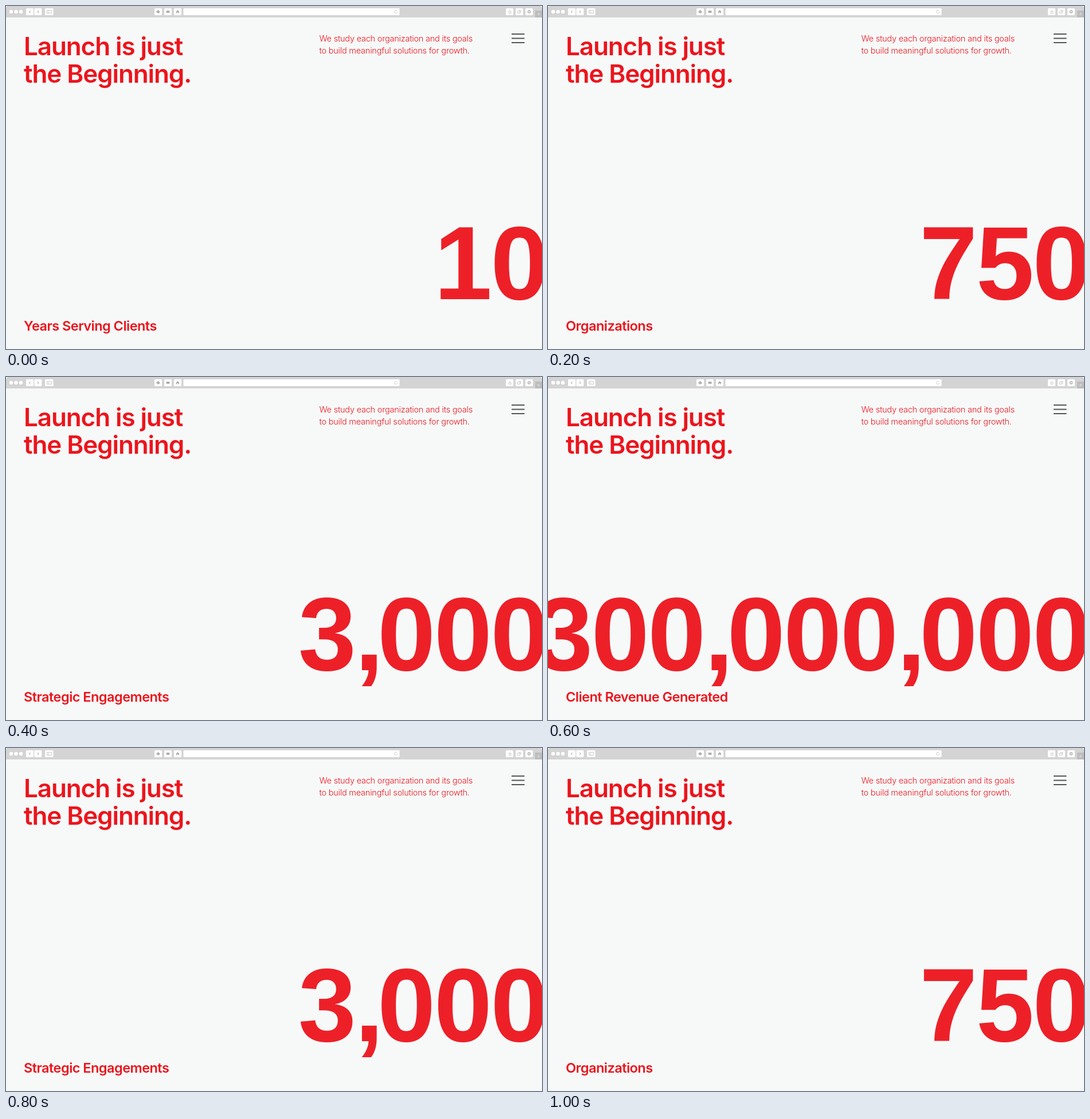
Recreate the animation shown at these times as an HTML page. Size 935 by 599 pixels, loop 1200 ms.

```html
<!DOCTYPE html>
<html lang="en">
<head>
<meta charset="utf-8">
<title>Counting up</title>
<style>
  html, body { margin: 0; width: 100%; height: 100%; overflow: hidden; background: #fff; }
  svg { display: block; width: 100%; height: 100%; }
  text { font-family: Inter, "Liberation Sans", sans-serif; font-optical-sizing: none; fill: #ed141c; }
  .title { font-size: 44px; font-weight: 640; letter-spacing: -1.1px; }
  .intro { font-size: 14.5px; font-weight: 300; letter-spacing: -.21px; }
  #label { font-size: 23.5px; font-weight: 640; letter-spacing: -.53px; }
  #count { font: bold 182px "Liberation Sans", Arial, sans-serif; fill: #ed2028; }
  .icon { fill: none; stroke: #ccc; }
</style>
</head>
<body>
<svg viewBox="0 0 935 599">
  <rect y="10" width="935" height="589" fill="#f7f9f9"/>
  <path d="M0 20V4Q0 0 4 0H931Q935 0 935 4V20Z" fill="#d4d4d4"/>
  <g id="bar" fill="#fff">
    <circle cx="9" cy="10" r="3.2"/>
    <circle cx="17.5" cy="10" r="3.2"/>
    <circle cx="26" cy="10" r="3.2"/>
  </g>
  <path d="M923 8H935V20H923Z" fill="#bdbdbd"/>
  <path d="M926.5 14H931.5M929 11.5V16.5" stroke="#ddd"/>
  <g class="icon">
    <path d="M42.5 8L40.5 10L42.5 12M55 8L57 10L55 12" stroke="#999"/>
    <path d="M71.5 7.5H79.5V12.5H71.5ZM74 7.5V12.5"/>
    <path d="M682 8.3A2.6 2.6 0 1 0 682.6 10"/>
    <path d="M877 9.5H881V12.5H877ZM879 10V7"/>
    <path d="M892.5 9H896.5V12.5H892.5ZM894.5 8.5V7.5H898V11H897"/>
  </g>
  <g fill="#b0b0b0">
    <path d="M262.5 9H268.5V11.5H262.5ZM264 7.5H267V12.5H264Z"/>
    <rect x="279.5" y="8" width="6" height="4" rx="1"/>
    <path d="M297 12.5V9.3L299.5 7.3L302 9.3V12.5H300.3V11H298.7V12.5Z"/>
    <circle cx="912.5" cy="10" r="2" fill="none" stroke="#b0b0b0" stroke-width="1.5"/>
  </g>
  <path d="M882 49H904.5M882 56.5H904.5M882 64H904.5" stroke="#555" stroke-width="2"/>
  <text class="title" x="31" y="86">Launch is just</text>
  <text class="title" x="31" y="134">the Beginning.</text>
  <text class="intro" x="546.5" y="61.5">We study each organization and its goals</text>
  <text class="intro" x="546.5" y="82.5">to build meaningful solutions for growth.</text>
  <text id="count" y="511.5"></text>
  <text id="label" x="31" y="567"></text>
</svg>
<script>
const STEP = 200, DIGIT = 98.6, COMMA = 39.8, LAST_X = 845.3;
const stats = [
  ["10", "Years Serving Clients"],
  ["750", "Organizations"],
  ["3,000", "Strategic Engagements"],
  ["300,000,000", "Client Revenue Generated"]
];
const bar = document.getElementById("bar");
const count = document.getElementById("count");
const label = document.getElementById("label");

function button(x, width = 13) {
  const box = document.createElementNS("http://www.w3.org/2000/svg", "rect");
  const attrs = { x, y: 4, width, height: 12, rx: 1.5 };
  for (const key in attrs) box.setAttribute(key, attrs[key]);
  bar.append(box);
}
[35, 49.3, 259, 276, 293, 872, 889, 906].forEach(x => button(x));
button(68, 14.5);
button(309.5, 377);

// Glyph origins, laid out from the right edge.
function positions(value) {
  let x = LAST_X + DIGIT;
  return [...value].reverse().map(c => x -= c === "," ? COMMA : DIGIT).reverse();
}

let shown = -1;
function draw() {
  const step = Math.floor(performance.now() / STEP) % 6;
  const index = Math.min(step, 6 - step);
  if (index !== shown) {
    const [value, caption] = stats[index];
    count.setAttribute("x", positions(value).join(" "));
    count.textContent = value;
    label.textContent = caption;
    shown = index;
  }
  requestAnimationFrame(draw);
}
draw();
</script>
</body>
</html>
```
